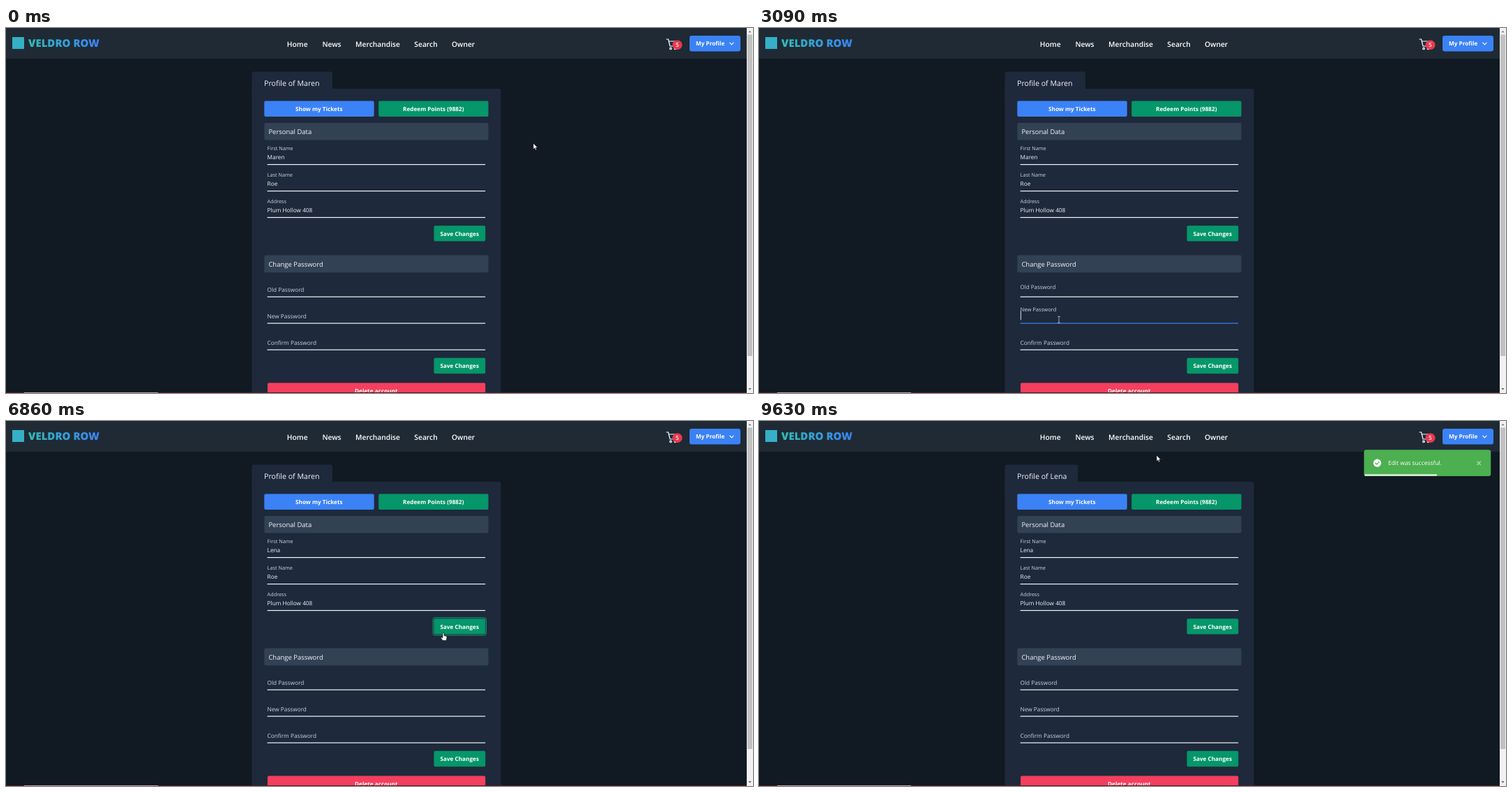
Write an HTML page that moves like this. It is 1071x523 px and loops after 9680 ms.

```html
<!DOCTYPE html>
<html lang="en">
<head>
<meta charset="utf-8">
<title>Profile page</title>
<style>
  html, body { margin: 0; width: 100%; height: 100%; overflow: hidden; background: #111922; }
  svg { display: block; width: 1071px; height: 523px; }
  text { font-family: "Open Sans", "Noto Sans", sans-serif; fill: #f1f5f9; font-size: 8.25px; text-rendering: geometricPrecision; }
  .mid { text-anchor: middle; }
  .nav { font-size: 10.3px; font-weight: 600; fill: #fff; }
  .btn { font-size: 8.2px; font-weight: 700; fill: #fff; }
  .head { font-size: 9.47px; }
  .title { font-size: 10.63px; }
  .brand { font-size: 15px; font-weight: 800; fill: url(#tint); }
  .note { font-size: 8.43px; fill: #fff; }
  .label { fill: #cbd5e1; }
  .card { fill: #1e293b; }
  .bar { fill: #334155; }
  .blue { fill: #3b82f6; }
  .green { fill: #059669; }
  .red { fill: #f43f5e; }
  .stroke { fill: transparent; stroke: #fff; stroke-width: 1.2; stroke-linecap: round; stroke-linejoin: round; }
  .shape { fill: #fff; stroke: #10151c; stroke-width: .7; stroke-linejoin: round; }
</style>
</head>
<body>
<svg viewBox="0 0 1071 523">
  <defs>
    <linearGradient id="tint" gradientUnits="userSpaceOnUse" x1="9" x2="137" y1="0" y2="0">
      <stop offset="0" stop-color="#2dc8a8"/><stop offset="1" stop-color="#3b82f6"/>
    </linearGradient>
  </defs>

  <!-- header -->
  <rect width="1062" height="44" fill="#1f2a35"/>
  <rect x="9" y="13" width="17" height="17" fill="#35b0c6"/>
  <text class="brand" x="32" y="27">VELDRO ROW</text>
  <g class="mid">
    <text class="nav" x="417.7" y="26.6">Home</text>
    <text class="nav" x="467" y="26.6">News</text>
    <text class="nav" x="533" y="26.6">Merchandise</text>
    <text class="nav" x="602" y="26.6">Search</text>
    <text class="nav" x="655.6" y="26.6">Owner</text>
  </g>
  <path class="stroke" d="M947 16H949.5L952 26H960.5L962 19H950.3"/>
  <circle class="stroke" cx="953" cy="29.4" r="1.3"/>
  <circle class="stroke" cx="959.5" cy="29.4" r="1.3"/>
  <rect x="955.5" y="17.5" width="14" height="13.5" rx="6.7" fill="#e8394f"/>
  <text class="mid" x="962.4" y="27.4" font-weight="600">5</text>
  <rect class="blue" x="980" y="11" width="73" height="22.5" rx="3"/>
  <text class="btn" x="989" y="25.4">My Profile</text>
  <path class="stroke" d="M1037.8 21.2L1040.4 23.8L1043 21.2"/>

  <!-- card -->
  <rect class="card" x="352.5" y="87" width="357" height="450" rx="3"/>
  <rect class="card" id="tab" x="352.5" y="62.5" height="40" rx="3"/>
  <text class="title" id="title" x="370" y="83.2"></text>
  <rect class="blue" x="370.3" y="104.6" width="157.4" height="22.4" rx="2"/>
  <text class="btn mid" x="448.8" y="119.2">Show my Tickets</text>
  <rect class="green" x="534.2" y="104.6" width="157.4" height="22.4" rx="2"/>
  <text class="btn mid" x="612.8" y="119.2">Redeem Points (9882)</text>
  <rect class="bar" x="370.3" y="136" width="321.3" height="24.5" rx="2"/>
  <text class="head" x="376.4" y="152">Personal Data</text>
  <rect class="bar" x="370.3" y="325.6" width="321.3" height="24.6" rx="2"/>
  <text class="head" x="376.4" y="341.7">Change Password</text>
  <g id="fields"></g>
  <rect id="caret" width=".9" height="13" fill="#f1f5f9"/>
  <rect class="green" x="613.5" y="283.2" width="73.8" height="22.4" rx="2"/>
  <rect id="ring" x="612.2" y="281.8" width="76.4" height="25.2" rx="3" fill="transparent" stroke="#10a878" stroke-width=".9"/>
  <text class="btn mid" x="650.2" y="297.7">Save Changes</text>
  <rect class="green" x="613.5" y="472.8" width="73.8" height="22.4" rx="2"/>
  <text class="btn mid" x="650.2" y="487.3">Save Changes</text>
  <rect class="red" x="375" y="508.4" width="312.3" height="20" rx="2"/>
  <text class="btn mid" x="530.8" y="523">Delete account</text>

  <!-- bottom strip and scrollbar -->
  <rect y="522" width="1062" height="1" fill="#5c1420"/>
  <rect x="26" y="522" width="192" height="1" fill="#c49aa2"/>
  <rect x="1062" width="9" height="523" fill="#f1f1f1"/>
  <rect x="1063" y="9.5" width="7" height="460.5" fill="#c1c1c1"/>
  <path d="M1064.4 6.2L1066.5 4L1068.6 6.2z" fill="#707070"/>
  <path d="M1064.4 516.2L1066.5 518.4L1068.6 516.2z" fill="#505050"/>

  <!-- toast -->
  <g id="toast">
    <rect x="867.4" y="41.2" width="181.8" height="37.8" rx="3" fill="#4caf50"/>
    <circle cx="886.4" cy="60.2" r="5.6" fill="#fff"/>
    <path class="stroke" style="stroke:#4caf50" d="M883.9 60.4L885.7 62.2L889 58.6"/>
    <text class="note" x="902" y="63.3">Edit was successful.</text>
    <path class="stroke" style="stroke:#b5deb7" d="M1029.8 57.8L1034.6 62.6M1034.6 57.8L1029.8 62.6"/>
    <rect id="timer" x="868.5" y="76.2" height="2.6" fill="#d9ecda"/>
  </g>

  <g id="pointer">
    <path class="shape" d="M0 0V8.8L2 6.9L3.3 9.9L4.8 9.2L3.5 6.4H6.2z"/>
    <path class="stroke" style="stroke:#c4cbd4;stroke-width:.8" d="M-1.6 -4.6H-.5L0 -4.2L.5 -4.6H1.6M0 -4.2V4.2M-1.6 4.6H-.5L0 4.2L.5 4.6H1.6"/>
    <path class="shape" d="M-1 .9Q0 -.5 1 .9V4.6L4.2 5.3Q5.3 5.7 5.1 6.9L4.4 11.6H-.9L-3.5 7.8Q-3.4 6.3 -2 7L-1 7.9z"/>
  </g>
</svg>
<script>
const LOOP = 9680, LEFT = 374.6, BLINK = 530, FLOAT = 200;
const SAVE = 6800, DONE = 6900;
const before = "Maren", after = "Lena";
const $ = id => document.getElementById(id);
const clamp = v => Math.min(1, Math.max(0, v));
const smooth = v => v * v * (3 - 2 * v);
const show = (el, on) => el.style.visibility = on ? "visible" : "hidden";

function add(tag, attrs, text = "") {
  const el = document.createElementNS("http://www.w3.org/2000/svg", tag);
  for (const key in attrs) el.setAttribute(key, attrs[key]);
  el.textContent = text;
  return $("fields").appendChild(el);
}

// label, value, underline y, focus start, focus end
const fields = [
  ["First Name", before, 195.6, 4600, SAVE],
  ["Last Name", "Roe", 233.6],
  ["Address", "Plum Hollow 408", 271.5],
  ["Old Password", "", 385.2, 1950, 3000],
  ["New Password", "", 423.1, 3000, 3750],
  ["Confirm Password", "", 461.1, 3750, 4600]
].map(([name, text, y, from = Infinity, to = Infinity]) => ({
  y, from, to, filled: text !== "",
  label: add("text", { class: "label", x: LEFT }, name),
  value: add("text", { x: LEFT, y: y - 7.2 }, text),
  line: add("rect", { x: 374.6, y: y - .6, width: 312.6, height: 1.2 })
}));

// time, x, y of the pointer
const route = [
  [1040, 756, 165], [1560, 448, 354], [1610, 448, 354], [1850, 436, 378],
  [2650, 436, 378], [2950, 430, 418], [3350, 430, 418], [3680, 430, 454],
  [4060, 430, 454], [4520, 428, 187], [5860, 428, 187], [6650, 627, 303],
  [6920, 627, 303], [7600, 760, 301], [8880, 760, 301], [9630, 570, 49]
];

function pointerAt(t) {
  const i = route.findIndex(stop => stop[0] > t);
  if (i === 0) return route[0].slice(1);
  if (i < 0) return route[route.length - 1].slice(1);
  const [t0, x0, y0] = route[i - 1], [t1, x1, y1] = route[i];
  const k = smooth((t - t0) / (t1 - t0));
  return [x0 + (x1 - x0) * k, y0 + (y1 - y0) * k];
}

// 0 arrow, 1 text beam, 2 hand
function pointerKind(x, y) {
  if (x > 613 && x < 688 && y > 283 && y < 306) return 2;
  const inField = x > 374 && x < 688 && fields.some(f => y > f.y - 19 && y < f.y);
  return inField ? 1 : 0;
}

const edits = [
  [5270, before.slice(0, 3)], [5320, before.slice(0, 1)], [5360, ""],
  ...[...after].map((_, i) => [5500 + 60 * i, after.slice(0, i + 1)])
];

function drawFields(t) {
  const edit = edits.filter(e => e[0] <= t).pop();
  fields[0].value.textContent = edit ? edit[1] : before;
  show($("caret"), false);
  for (const f of fields) {
    const rise = 1 - clamp((t - f.from) / FLOAT), fall = 1 - clamp((t - f.to) / FLOAT);
    const up = f.filled ? 1 : t < f.from ? 0 : t < f.to ? 1 - rise * rise : fall * fall;
    const focused = t >= f.from && t < f.to;
    f.label.setAttribute("y", f.y - 7 - 13.9 * up);
    f.label.style.fontSize = 8.25 - .95 * up + "px";
    f.line.setAttribute("fill", focused ? "#3b82f6" : "#f1f5f9");
    if (!focused) continue;
    const key = f === fields[0] && edit ? edit[0] : f.from;
    const caret = $("caret");
    caret.setAttribute("x", LEFT + .3 + f.value.getComputedTextLength());
    caret.setAttribute("y", f.y - 17.8);
    show(caret, Math.floor((t - key) / BLINK) % 2 === 0);
  }
}

function draw(t) {
  drawFields(t);
  const saved = t >= DONE;
  $("title").textContent = "Profile of " + (saved ? after : before);
  $("tab").setAttribute("width", saved ? 104.8 : 115.5);
  show($("ring"), t >= SAVE && t < 7000);
  $("toast").style.opacity = clamp((t - DONE) / 300);
  $("timer").setAttribute("width", Math.min(180, 145.5 - .0273 * (t - 8090)));

  const [x, y] = pointerAt(t), kind = pointerKind(x, y);
  $("pointer").setAttribute("transform", `translate(${x} ${y})`);
  [...$("pointer").children].forEach((el, i) => show(el, i === kind));
}

const start = performance.now();
function tick() {
  draw((performance.now() - start) % LOOP);
  requestAnimationFrame(tick);
}
tick();
</script>
</body>
</html>
```
